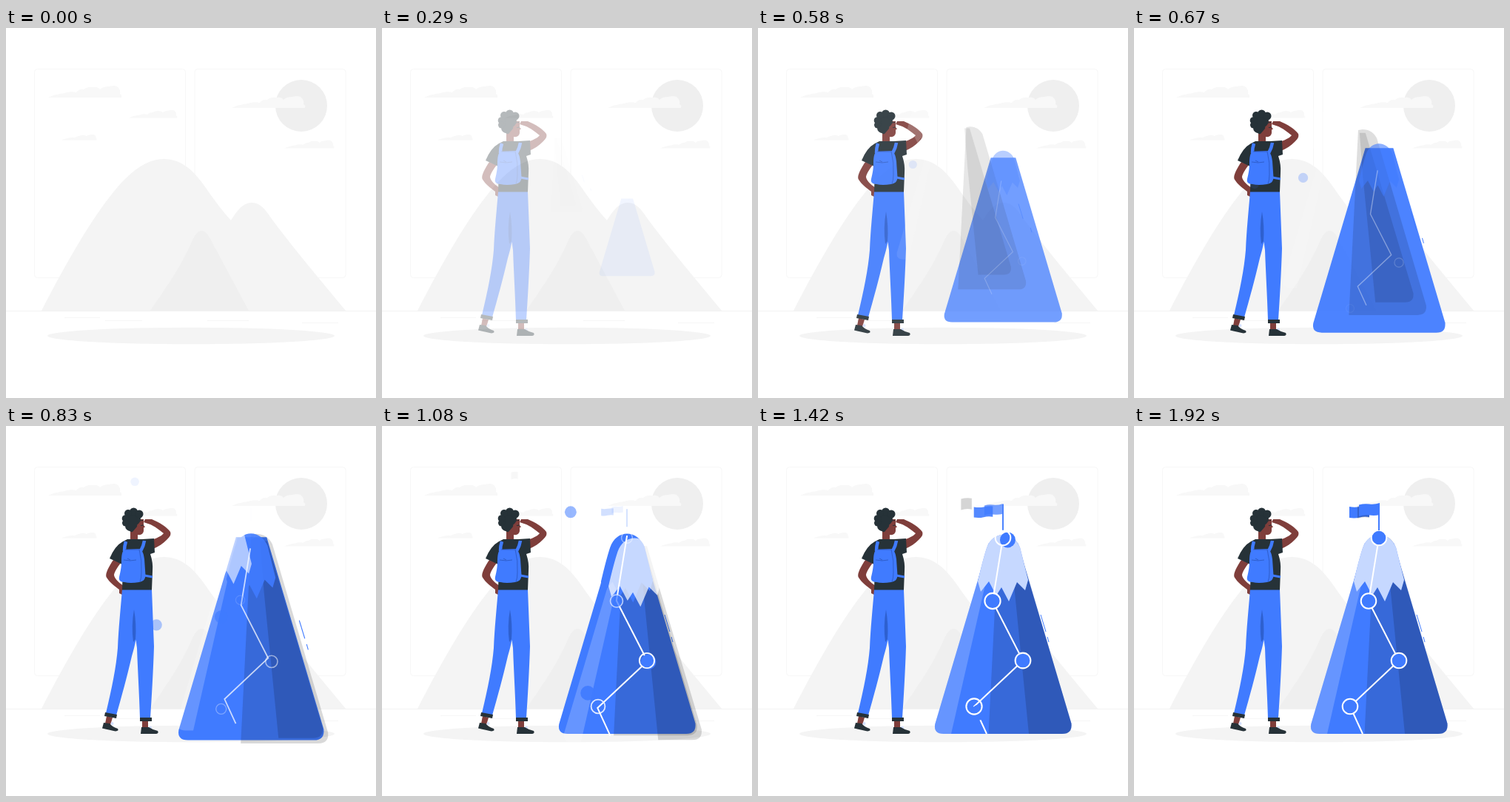
An HTML page with a canvas that plays this animation: 500 by 500 pixels, repeating every 1960 ms.

```html
<!DOCTYPE html>
<html lang="en">
<head>
<meta charset="utf-8">
<title>Mountain goal</title>
<style>
html, body { margin: 0; width: 100%; height: 100%; overflow: hidden; background: #fff; }
canvas { display: block; width: 100vmin; height: 100vmin; }
</style>
</head>
<body>
<canvas id="stage"></canvas>
<script>
const LOOP = 1960, STEP = 1000 / 24, LAG = 48.7, SIZE = 500;
const BLUE = '#407bff', DARK = '#263238', SKIN = '#7f3e3b', NAVY = '#2b57bd';
const dpr = window.devicePixelRatio || 1;
const stage = document.getElementById('stage');
const sheet = document.createElement('canvas');
for (const c of [stage, sheet]) c.width = c.height = Math.round(SIZE * dpr);
const out = stage.getContext('2d'), tmp = sheet.getContext('2d');
let g = out;

// overshooting ease: cubic-bezier(.36, -.01, .5, 1.38)
const bez = (a, b, u) => 3 * a * u * (1 - u) ** 2 + 3 * b * u * u * (1 - u) + u ** 3;
function ease(x) {
  if (x <= 0) return 0;
  if (x >= 1) return 1;
  let lo = 0, hi = 1;
  for (let i = 0; i < 24; i++) {
    const m = (lo + hi) / 2;
    if (bez(.36, .5, m) < x) lo = m; else hi = m;
  }
  return bez(-.01, 1.38, lo);
}

function fill(d, color) {
  g.fillStyle = color;
  g.fill(new Path2D(d));
}
function line(d, color, w) {
  g.strokeStyle = color;
  g.lineWidth = w;
  g.stroke(new Path2D(d));
}
function disc(x, y, r, color) {
  g.beginPath();
  g.arc(x, y, r, 0, 7);
  g.fillStyle = color;
  g.fill();
}
function ring(x, y) {
  g.beginPath();
  g.arc(x, y, 10.3, 0, 7);
  g.strokeStyle = '#fff';
  g.lineWidth = 2;
  g.stroke();
}
function zoom(s, x, y) {
  g.translate(x, y);
  g.scale(s, s);
  g.translate(-x, -y);
}

// draws on a separate sheet, then lays it over the stage as one
function layer(alpha, draw) {
  tmp.setTransform(1, 0, 0, 1, 0, 0);
  tmp.clearRect(0, 0, sheet.width, sheet.height);
  tmp.setTransform(dpr, 0, 0, dpr, 0, 0);
  g = tmp;
  draw();
  g = out;
  g.globalAlpha = Math.min(1, Math.max(0, alpha));
  g.drawImage(sheet, 0, 0, SIZE, SIZE);
  g.globalAlpha = 1;
}

function cloud(x, y, s) {
  g.save();
  g.translate(x, y);
  g.scale(s, s);
  fill('M0 0C8-4 16-5 22-6Q30-9 38-7Q42-12 48-11Q53-15 61-14Q67-15 70-11Q74-15 82-15Q92-18 95-13Q98-10 97-5Q100-4 99 0Z', '#f8f8f8');
  g.restore();
}

function scene() {
  g.strokeStyle = '#f7f7f7';
  g.lineWidth = 1;
  for (const x of [38.5, 255]) {
    g.beginPath();
    g.roundRect(x, 55.5, 204, 282, 4);
    g.stroke();
  }
  disc(399, 105, 35, '#efefef');
  cloud(57, 94, 1);
  cloud(305, 108, 1);
  cloud(166, 121.5, .66);
  cloud(376, 162.5, .68);
  cloud(75, 151.5, .48);
  fill('M48 382C75 330 110 265 145 222C172 188 195 177 213 177C238 177 255 194 270 216C281 232 293 248 304 260C312 247 320 236 332 236C345 236 352 248 362 262C392 302 426 342 459 382Z', '#f4f4f4');
  fill('M195 382C212 357 230 332 245 302C252 288 256 274 264 274C272 274 275 284 283 298L328 382Z', '#efefef');
  line('M0 382.5H500', '#f2f2f2', 1);
  line('M134 395.5H184M272 395.5H328M400 398.5H449M79 391.5H127', '#f6f6f6', 1);
  g.beginPath();
  g.ellipse(250, 416, 194, 11.3, 0, 0, 7);
  g.fillStyle = '#f4f4f4';
  g.fill();
}

function person() {
  // feet
  fill('M136 392L144 394L141 404L134 402Z', SKIN);
  fill('M184 398H192V409H184Z', SKIN);
  disc(143.5, 402, 2, '#d5e1ff');
  disc(195, 407.5, 2, '#d5e1ff');
  fill('M132 401L140 402Q144 407 151 409Q153 412 148 412.5Q141 411 130 408.5Z', DARK);
  fill('M183 407H193Q199 411 205 412Q207 415 203 416L182 416Z', DARK);
  // arms behind the shirt
  fill('M145 181C139 190 134 199 135.500 204C140 212 148 217 153 221L153 226L157 228L159 216C152 212 146 205 146 201C147 196 152 189 155 185Z', SKIN);
  fill('M199 153C206 151 212 147 213 145C208 141 200 135 195 133L186 130L188 126L197 126C207 130 218 137 222 143C223.500 147 221 150 218 153C212 159 206 163 199 166Z', SKIN);
  // legs
  fill('M157 221H197L200 298C199 330 197 365 195 395H181C180 360 178 330 177 300L175.500 289C174 297 172 304 170 311C163 341 156 366 149 391L135 388C143 355 149 325 151 300C152 275 155 245 157 221Z', BLUE);
  fill('M173 248Q169 270 172 292L175 288Q176.500 268 173 248Z', '#2e60cf');
  fill('M134 387L150 390L149 395L133 392Z', DARK);
  fill('M181 394H197V399H181Z', DARK);
  // head
  fill('M168 138L176 126L186 126V134L188 136.500L186 137.500V142Q185 148 178 147V155H168Z', SKIN);
  for (const [x, y, r] of [[172, 125, 10], [172.5, 116, 5.5], [180, 119, 5.5], [165, 118, 5], [161.5, 125, 4.8], [161.5, 131, 4.5], [168, 135, 7]])
    disc(x, y, r, DARK);
  fill('M163 137Q167 144 171 143L177 136L178 128L168 128Z', DARK);
  line('M181 128L185 127.500M182 134.500L186 134', DARK, 1);
  // shirt
  fill('M164 153H184L200 152L201 171L195 173Q199 185 198 196L197 221.500H157L158 187L156 186.500L140 179Q147 162 158 156Z', DARK);
  // backpack
  line('M160 169Q160 162 162 156', BLUE, 4.5);
  line('M182 169Q186 162 187 155', BLUE, 4.5);
  line('M187 202L198 204', BLUE, 3);
  fill('M160 167L180 166C184 167 186 172 187 180L188.500 202C188 208 185 210 180 211Q168 213 160 211C154 211 152 208 153 204C155 195 156 190 156 183C156 175 157 169 160 167Z', BLUE);
  line('M159 181Q168 183 176 181M164 179L168 181M180 166.500Q184 182 183 198Q183 206 181 210.500M161 167H180', NAVY, .8);
}

const CAP = 'M297 210Q304 180 309 165C313 153 322 147 331 147C341 147 350 154 354 164L365 208L361 222L350 211L339 237L329 218L322 229L312 210L301 224Z';
const HERE = [0, 0];

// [order, pivot, draw]
const parts = [
  [-.1, HERE, () => line('M391 285L393 292', BLUE, 1)],
  [.5, HERE, () => line('M382 255L389 278', BLUE, 1)],
  [1, [331, 285], () => fill('M312 158H351L423.500 402Q425 416 411 416H251Q237 416 239.200 403Z', BLUE)],
  [2, HERE, () => fill('M325 148L331 147C341 147 348 152 352 160L423.500 402Q425 416 411 416H311.500Z', 'rgba(0,0,0,.15)')],
  [3, HERE, () => fill('M342 159H351L423.500 402Q425 416 411 416H366L347 225Z', 'rgba(0,0,0,.15)')],
  [4, HERE, () => fill('M312 158H320L261 416H251Q237 416 239.200 403Z', 'rgba(255,255,255,.2)')],
  [5, [331, 192], () => fill(CAP, BLUE)],
  [6, HERE, () => fill(CAP, 'rgba(255,255,255,.7)')],
  [7, [325, 283.5], () => line('M331 151L317 237L358 317L292 379L309 416', '#fff', 2)],
  ...node(8, 358, 317, HERE),
  ...node(10, 292, 379, HERE),
  ...node(12, 317, 236.5, [317, 236.5]),
  ...node(14, 331, 151, HERE),
  [16, [331, 127], () => line('M331 105V141', BLUE, 2)],
  [17, [304.5, 116.5], () => fill('M291 109Q298 110.500 305 109T318 108V123Q311 122 305 123.500T291 124Z', BLUE)],
  [18, HERE, () => fill('M302 108.500Q310 106 318 107.500V124Q310 122 302 125Z', 'rgba(0,0,0,.2)')],
  [19, [318, 113], () => fill('M304 106.500Q311 104.500 318 105.500T332 104V120Q325 121.500 318 120.500T304 122Z', BLUE)]
];

function node(order, x, y, pivot) {
  return [
    [order, pivot, () => disc(x, y, 10.3, BLUE)],
    [order + 1, [x, y], () => ring(x, y)]
  ];
}

function peak(t, grow) {
  zoom(.5 + grow / 2, 331, 276);
  for (const [order, [x, y], draw] of parts) {
    const e = ease((t - order * LAG) / 1000);
    if (e <= 0) continue;
    g.save();
    g.globalAlpha = Math.min(1, e);
    zoom(.5 + e / 2, x, y);
    draw();
    g.restore();
  }
}

function render(now) {
  const at = now % LOOP;
  let k = Math.ceil(at / STEP) + 1;
  while (k > 0 && Math.round(k * STEP / 10) * 10 > at) k--;
  const t = k * STEP;
  out.setTransform(dpr, 0, 0, dpr, 0, 0);
  out.fillStyle = '#fff';
  out.fillRect(0, 0, SIZE, SIZE);
  scene();
  if (k > 1) {
    const e = ease((t + 15) / 1000);
    layer(e, person);
    layer(e, () => peak(t, e));
  }
}

const start = performance.now();
function tick() {
  render(performance.now() - start);
  requestAnimationFrame(tick);
}
tick();
</script>
</body>
</html>
```
